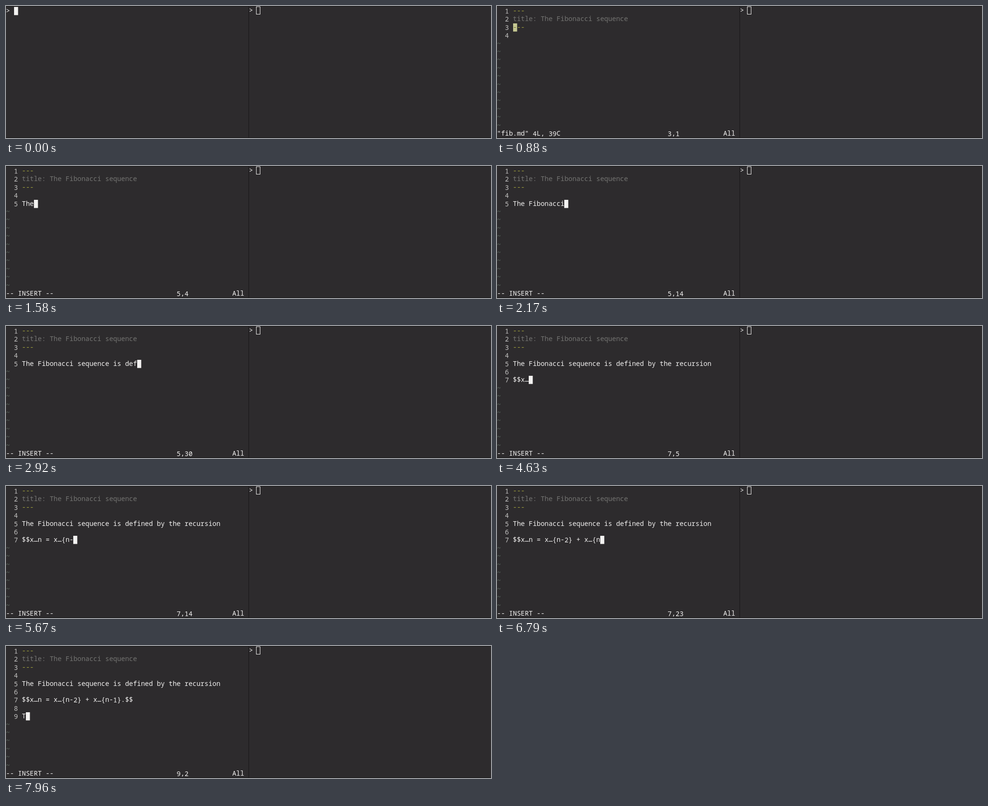
An HTML page with a canvas that plays this animation: 1024x281 px, repeating every 8 s.

```html
<!DOCTYPE html>
<html lang="en">
<head>
<meta charset="utf-8">
<title>Typing in vim</title>
<style>
  html, body { margin: 0; height: 100%; overflow: hidden; background: #2d2b2d; }
  canvas { display: block; }
</style>
</head>
<body>
<canvas id="stage" width="1024" height="281"></canvas>
<script>
const ctx = document.getElementById('stage').getContext('2d');
const LOOP = 8000, CELL = 8.38, ROW = 17.4, TOP = 2, GUTTER = 4, STATUS_ROW = 15;
const BG = '#2d2b2d', WHITE = '#f3f2f1', NUMBER = '#c3c2c1', TITLE = '#747472',
      DASH = '#a3a43c', TILDE = '#5a665d', EDGE = '#171617';

// Typed text: [time of first key, time of last key, characters]
const command = [[80, 500, 'vim fib.md']];
const body = [
  [1380, 1380, 'T'],
  [1500, 2170, 'he Fibonacci'],
  [2215, 3500, ' sequence is defined by the re'],
  [3560, 3960, 'cursion'],
  [4130, 4290, '\n\n$$x'],
  [4630, 4630, '_'],
  [4720, 5380, 'n = x_{'],
  [5580, 5670, 'n-'],
  [5920, 6380, '2} + x_{'],
  [6750, 7500, 'n-1}.$$'],
  [7830, 7870, '\n\n'],
  [7960, 7960, 'T']
];
const ENTER = 670, OPEN = 740, INSERT = 1200;
const moves = [840, 880, 920];   // cursor down, one line each
const header = ['---', 'title: The Fibonacci sequence', '---', ''];
const headerColors = [DASH, TITLE, DASH, WHITE];

function typed(runs, t) {
  return runs.map(([start, end, text]) => {
    if (t < start) return '';
    const step = (end - start) / Math.max(1, text.length - 1);
    return step ? text.slice(0, Math.floor((t - start) / step + 1.001)) : text;
  }).join('');
}

// Digits sit a little low in the line, underscores high
function shift(ch) {
  return ch === '_' ? -3 : /\d/.test(ch) ? 1 : 0;
}

function write(text, col, row, color = WHITE) {
  const base = Math.round(TOP + row * ROW) + 13;
  ctx.fillStyle = color;
  [...text].forEach((ch, i) => ctx.fillText(ch, (col + i) * CELL, base + shift(ch)));
}

function cursor(col, row, color = WHITE) {
  ctx.fillStyle = color;
  ctx.fillRect(Math.round(col * CELL), Math.round(TOP + row * ROW), 8.5, 17.4);
}

function drawShell(t) {
  const text = typed(command, t);
  write('> ' + text, 0, 0);
  if (t < ENTER) cursor(2 + text.length, 0);
  else cursor(0, 1);
}

function drawEditor(t) {
  const inserting = t >= INSERT;
  const added = inserting ? typed(body, t).split('\n') : [];
  const lines = [...header, ...added];
  const row = inserting ? lines.length - 1 : moves.filter(m => t >= m).length;
  const col = inserting ? lines[row].length : 0;

  lines.forEach((line, i) => {
    write(String(i + 1), 2, i, NUMBER);
    write(line, GUTTER, i, headerColors[i] || WHITE);
  });
  for (let i = lines.length; i < STATUS_ROW; i++) write('~', 0, i, TILDE);

  const under = lines[row][col];
  cursor(GUTTER + col, row, under ? '#c5c892' : WHITE);
  if (under) write(under, GUTTER + col, row, '#6a6b2e');

  write(inserting ? '-- INSERT --' : '"fib.md" 4L, 39C', 0, STATUS_ROW);
  write(`${row + 1},${lines[row] || inserting ? col + 1 : '0-1'}`, 43, STATUS_ROW);
  write('All', 57, STATUS_ROW);
}

function drawFrame() {
  ctx.fillStyle = EDGE;
  ctx.fillRect(0, 0, 1024, 1);
  ctx.fillRect(0, 280, 1024, 1);
  ctx.fillRect(512, 0, 1, 281);
  ctx.save();
  ctx.translate(513, -1);
  write('>', 0, 0);
  ctx.restore();
  ctx.strokeStyle = WHITE;
  ctx.lineWidth = 1;
  ctx.strokeRect(528.5, 1.5, 8, 16);
}

const start = performance.now();
function render() {
  const t = (performance.now() - start) % LOOP;
  ctx.font = '14px "Noto Sans Mono", "DejaVu Sans Mono", monospace';
  ctx.fillStyle = BG;
  ctx.fillRect(0, 0, 1024, 281);
  if (t < OPEN) drawShell(t);
  else drawEditor(t);
  drawFrame();
  requestAnimationFrame(render);
}
render();
</script>
</body>
</html>
```
